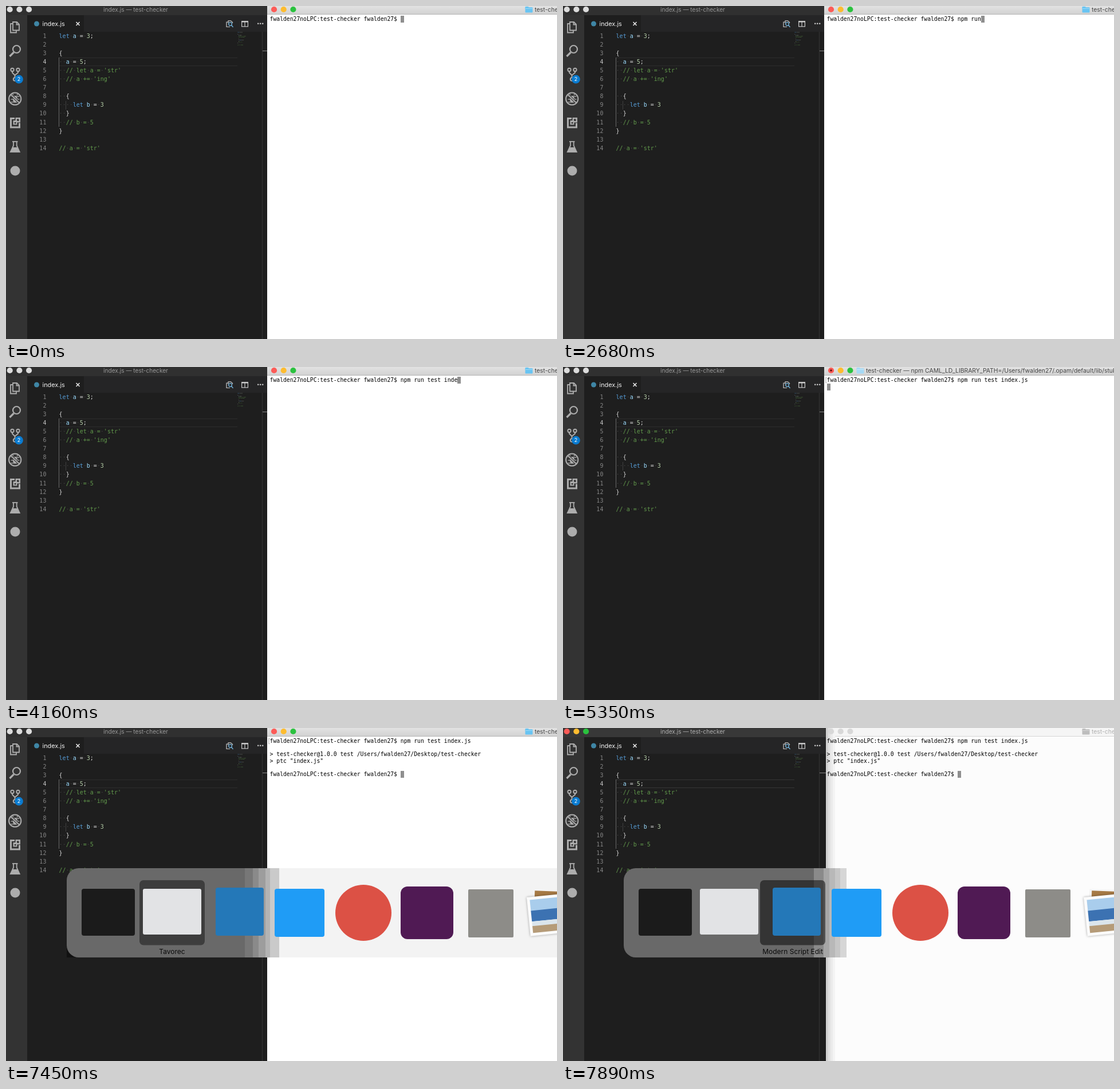
An HTML page with a canvas that plays this animation: 962x582 px, repeating every 8000 ms.

```html
<!DOCTYPE html>
<html lang="en">
<head>
<meta charset="utf-8">
<title>test-checker</title>
<style>
  html, body { margin: 0; width: 962px; height: 582px; overflow: hidden; background: #1e1e1e; }
  canvas { display: block; }
</style>
</head>
<body>
<canvas id="stage" width="962" height="582"></canvas>
<script>
const c = document.getElementById('stage').getContext('2d');
const W = 962, H = 582, LOOP = 8000;
const MONO = '"DejaVu Sans Mono", monospace';
const SANS = 'Inter, "Liberation Sans", sans-serif';

const USER = 'fwalden27';
const PROMPT = USER + 'noLPC:test-checker ' + USER + '$ ';
const COMMAND = 'npm run test index.js';
const OUTPUT = ['> test-checker@1.0.0 test /Users/' + USER + '/Desktop/test-checker', '> ptc "index.js"'];
const LONG_TITLE = 'test-checker — npm CAML_LD_LIBRARY_PATH=/Users/' + USER + '/.opam/default/lib/stublibs';

// moment at which each further character is on screen
const KEYS = [590, 740, 890, 1030, 1180, 1780, 2680, 2830, 2980, 3130, 3280, 3430,
  3720, 3870, 4010, 4160, 4160, 4460, 4760, 4910, 5050];
const ENTER = 5350, PRINTED = 5650, DONE = 5950, SWITCH = 7450, NEXT = 7750, FOCUS = 7890;

const BLUE = '#569cd6', VAR = '#9cdcfe', NUM = '#b5cea8', PLAIN = '#d4d4d4', NOTE = '#629a4c';
const CODE = [
  [['let', BLUE], [' a', VAR], [' = ', PLAIN], ['3', NUM], [';', PLAIN]],
  [],
  [['{', PLAIN]],
  [['  a', VAR], [' = ', PLAIN], ['5', NUM], [';', PLAIN]],
  [["  // let a = 'str'", NOTE]],
  [["  // a += 'ing'", NOTE]],
  [],
  [['  {', PLAIN]],
  [['    let', BLUE], [' b', VAR], [' = ', PLAIN], ['3', NUM]],
  [['  }', PLAIN]],
  [['  // b = 5', NOTE]],
  [['}', PLAIN]],
  [],
  [["// a = 'str'", NOTE]]
];

function rect(x, y, w, h, color) {
  c.fillStyle = color;
  c.fillRect(x, y, w, h);
}
function round(x, y, w, h, r, color) {
  c.fillStyle = color;
  c.beginPath();
  c.roundRect(x, y, w, h, r);
  c.fill();
}
function disc(x, y, r, color) {
  c.fillStyle = color;
  c.beginPath();
  c.arc(x, y, r, 0, 7);
  c.fill();
}
function ring(x, y, r) {
  c.beginPath();
  c.arc(x, y, r, 0, 7);
  c.stroke();
}
function line(...p) {
  c.beginPath();
  for (let i = 0; i < p.length; i += 2) c.lineTo(p[i], p[i + 1]);
  c.stroke();
}
function pen(color, width) {
  c.strokeStyle = color;
  c.lineWidth = width;
}
function text(s, x, y, size, color, font = SANS, align = 'left') {
  c.font = size + 'px ' + font;
  c.textAlign = align;
  c.fillStyle = color;
  c.fillText(s, x, y);
}
function lights(x, colors) {
  colors.forEach((color, i) => disc(x + i * 16.7, 6, 5.1, color));
}
const LIVE = ['#fc5b57', '#fdbc2f', '#2ac23e'];

function activityBar() {
  const grey = '#adadad';
  rect(0, 16, 37, H, '#333333');

  // files
  pen(grey, 1.8);
  line(12, 31, 8, 31, 8, 46.5, 18, 46.5, 18, 43);
  c.beginPath();
  c.moveTo(12, 28); c.lineTo(19, 28); c.lineTo(23, 32); c.lineTo(23, 42.5); c.lineTo(12, 42.5);
  c.closePath();
  c.stroke();
  line(18.5, 28, 18.5, 32.5, 23, 32.5);

  // search
  pen(grey, 2.2);
  ring(18.5, 75.5, 6.5);
  pen(grey, 3.2);
  line(13.5, 81, 6.5, 88);

  // branches
  pen(grey, 1.9);
  ring(11, 111.5, 2.7);
  ring(21, 111.5, 2.7);
  ring(15.5, 128, 2.7);
  line(11, 114.5, 11, 116.5, 15.5, 121, 15.5, 125);
  line(21, 114.5, 21, 116.5, 15.5, 121);
  disc(22.5, 128, 7.4, '#0a7bd0');
  text('2', 22.5, 131.3, 9, '#fff', SANS, 'center');

  // bug
  c.fillStyle = grey;
  c.beginPath();
  c.ellipse(16, 163, 4.2, 6, 0, 0, 7);
  c.fill();
  pen(grey, 1.3);
  for (const y of [158, 163, 168]) line(8.5, y, 23.5, y);
  line(13, 156, 11.5, 153.5);
  line(19, 156, 20.5, 153.5);
  pen('#333333', 4);
  line(8, 154.5, 24, 170);
  pen(grey, 2);
  line(8, 154.5, 24, 170);
  ring(15.7, 162.2, 10.6);

  // extensions
  pen(grey, 3);
  c.strokeRect(8.5, 196.5, 15, 15.5);
  rect(15, 194, 11, 10.5, '#333333');
  rect(16.5, 195, 8.5, 8.5, grey);
  rect(19, 197.5, 3.5, 3.5, '#333333');
  rect(12.5, 200, 7, 7.5, grey);
  rect(14.8, 203, 2.6, 2.6, '#333333');

  // beaker
  pen(grey, 1.8);
  line(11, 237, 20.5, 237);
  c.beginPath();
  c.moveTo(13, 237); c.lineTo(13, 244); c.lineTo(7.8, 255); c.lineTo(23.8, 255);
  c.lineTo(18.7, 244); c.lineTo(18.7, 237);
  c.stroke();
  c.fillStyle = grey;
  c.beginPath();
  c.moveTo(12, 247); c.lineTo(19.7, 247); c.lineTo(23.5, 255); c.lineTo(8, 255);
  c.fill();

  disc(16, 288, 8.5, grey);
}

function tabBar() {
  rect(37, 16, 423, 29, '#252526');
  rect(37, 16, 99, 29, '#1e1e1e');
  disc(53.5, 31, 4.5, '#3f86a5');
  text('index.js', 63.5, 35, 10.9, '#f2f2f2');
  pen('#e8e8e8', 1.6);
  line(122.5, 28, 128.5, 34);
  line(128.5, 28, 122.5, 34);

  // compare, split and more
  const ink = '#c8c8c8';
  pen(ink, 1.2);
  line(388, 28, 385, 28, 385, 36.5, 391, 36.5);
  line(388, 30, 388, 25.8, 392.5, 25.8, 395.5, 28.5, 395.5, 30);
  pen('#75b5dd', 1.3);
  ring(391.5, 31.5, 2.8);
  line(393.5, 33.5, 396.5, 37);
  pen(ink, 1.2);
  c.strokeRect(411.6, 26.6, 10.8, 9.3);
  rect(411, 26, 12, 2.5, ink);
  line(417, 27, 417, 36);
  for (let i = 0; i < 3; i++) disc(440.2 + i * 4, 30.8, 1.3, ink);
}

function codeLines(active) {
  const top = 44.7, step = 15.08, left = 92.6, size = 10;
  const edge = active ? '#363636' : '#2d2d2d';
  rect(93, 90, 311, 1, edge);
  rect(93, 104, 311, 1, edge);
  rect(92, 90, 1, 121, '#686868');
  rect(104, 166, 1, 15, '#404040');
  CODE.forEach((parts, n) => {
    const y = Math.round(top + n * step + 11);
    let col = 0;
    text(n + 1, 70.4, y, size, n === 3 ? '#c6c6c6' : '#858585', MONO, 'right');
    for (const [s, color] of parts) {
      text(s, left + col * 6.02, y, size, color, MONO);
      for (const ch of s) {
        if (ch === ' ') rect(left + col * 6.02 + 2.4, y - 4.2, 1.2, 1.2, '#484848');
        col++;
      }
    }
    // overview at the right
    let x = 404.5;
    c.globalAlpha = 0.5;
    for (const [s, color] of parts) {
      for (const ch of s) {
        if (ch !== ' ') rect(x, 45.5 + n * 1.7, 0.7, 1, color);
        x += 0.8;
      }
    }
    c.globalAlpha = 1;
  });
  rect(447, 45, 1, H, '#353535');
  rect(448, 78, 12, 1, '#8a8a8a');
}

function editor(active) {
  rect(0, 0, 460, H, '#1e1e1e');
  rect(0, 0, 460, 16, active ? '#383838' : '#303030');
  lights(6.7, active ? LIVE : ['#dcdcdc', '#dcdcdc', '#dcdcdc']);
  text('index.js — test-checker', 226.5, 10, 10.1, active ? '#b0b0b0' : '#999999', SANS, 'center');
  tabBar();
  codeLines(active);
  activityBar();
}

function folder(x, color) {
  round(x, 1, 6, 4, 1, color);
  round(x, 2.3, 13, 9.2, 1, color);
  rect(x + 0.5, 4, 12, 0.8, 'rgba(255,255,255,.45)');
}

function terminal(t, front) {
  const x0 = front ? 456 : 459;
  const busy = t >= ENTER && t < DONE;
  c.save();
  c.beginPath();
  c.rect(x0, 0, W, H);
  c.clip();
  rect(x0, 0, W, H, front ? '#ffffff' : '#fcfcfc');
  if (front) {
    const bar = c.createLinearGradient(0, 0, 0, 14);
    bar.addColorStop(0, '#e2e2e2');
    bar.addColorStop(1, '#d2d2d2');
    rect(x0, 0, W, 14, bar);
    rect(x0, 14, W, 1, '#b4b4b4');
  } else {
    rect(x0, 0, W, 14, '#f5f5f5');
    rect(x0, 14, W, 1, '#d6d6d6');
    ['#d2d2d2', '#e0e0e0', '#ebebeb', '#f4f4f4'].forEach((color, i) =>
      rect(x0 + i * 4, 0, 4, H, color));
  }
  lights(468, front ? LIVE : ['#d8d8d8', '#d8d8d8', '#d8d8d8']);
  if (busy) {
    if (t < PRINTED) disc(468, 6, 1.7, '#5c0907');
    folder(512.5, '#a5d9f5');
    text(LONG_TITLE, 529, 10, 10.4, '#454545');
  } else {
    folder(906.5, front ? '#68c4f2' : '#bdbdbd');
    text('test-checker', 923, 10, 10.4, front ? '#454545' : '#b0b0b0');
  }

  const typed = KEYS.filter(k => t >= k).length;
  const rows = [PROMPT + COMMAND.slice(0, typed)];
  if (t >= ENTER) rows.push('');
  if (t >= PRINTED) rows.push(...OUTPUT, '');
  if (t >= DONE) rows.push(PROMPT);
  const step = 11.67, size = 9.72;
  rows.forEach((s, i) => text(s, 460.6, Math.round(26 + i * step), size, '#000', MONO));
  if (t >= ENTER && front) text('[', 456.3, 26, size, '#9a9a9a', MONO);
  const last = rows.length - 1;
  rect(Math.round(460.6 + rows[last].length * 5.852), Math.round(17 + last * step), 6, 12, '#8f8f8f');
  c.restore();
}

function photos() {
  c.save();
  c.translate(940, 292);
  c.rotate(0.04);
  rect(-21, -10, 60, 70, '#f4f4f4');
  rect(-17, -7, 60, 20, '#a67a45');
  c.restore();
  c.save();
  c.translate(909, 296);
  c.rotate(-0.1);
  c.shadowColor = 'rgba(0,0,0,.35)';
  c.shadowBlur = 4;
  rect(0, 0, 80, 68, '#fbfbfb');
  c.shadowBlur = 0;
  rect(5, 5, 80, 20, '#a9cdec');
  rect(5, 24, 80, 19, '#3c72b2');
  rect(5, 43, 80, 10, '#dbe5ec');
  rect(5, 51, 80, 12, '#b59b78');
  c.restore();
}

function switcher(second, front) {
  const edges = front ? [106, 417, 431, 441, 453, 461, 477] : [106, 438, 455, 465, 475, 484, 495];
  const tones = front
    ? ['#696969', '#777777', '#8a8a8a', '#9d9d9d', '#b3b3b3', '#cacaca', '#f3f3f3']
    : ['#696969', '#8a8a8a', '#a6a6a6', '#b8b8b8', '#c6c6c6', '#d6d6d6', '#fcfcfc'];
  if (front) rect(106, 381, 19, 20, '#111111');
  c.save();
  c.beginPath();
  c.roundRect(106, 245, 900, 156, 21);
  c.clip();
  edges.forEach((x, i) => rect(x, 245, W, 156, tones[i]));
  c.restore();

  const x = second ? 344 : 233;
  round(x, 266, 114, 113.5, 7, second ? 'rgba(0,0,0,.5)' : 'rgba(0,0,0,.42)');
  text(second ? 'Modern Script Edit' : 'Tavorec', x + 57, 395.3, 12, '#0a0a0a', SANS, 'center');

  round(132, 281, 93, 82, 4, '#1b1b1b');
  round(239, 281, 102, 80, 3, '#e2e3e5');
  round(366, 279, 84, 84, 4, '#2478b8');
  round(469, 281, 87, 84, 4, '#1f9cf6');
  disc(624, 323, 49, '#dc5145');
  round(689, 277, 92, 92, 12, '#501a54');
  round(807, 282, 79, 84, 2, '#8d8c88');
  photos();
}

function draw(t) {
  const front = t < FOCUS;
  editor(!front);
  terminal(t, front);
  if (t >= SWITCH) switcher(t >= NEXT, front);
}

const start = performance.now();
function tick() {
  draw((performance.now() - start) % LOOP);
  requestAnimationFrame(tick);
}
tick();
</script>
</body>
</html>
```
